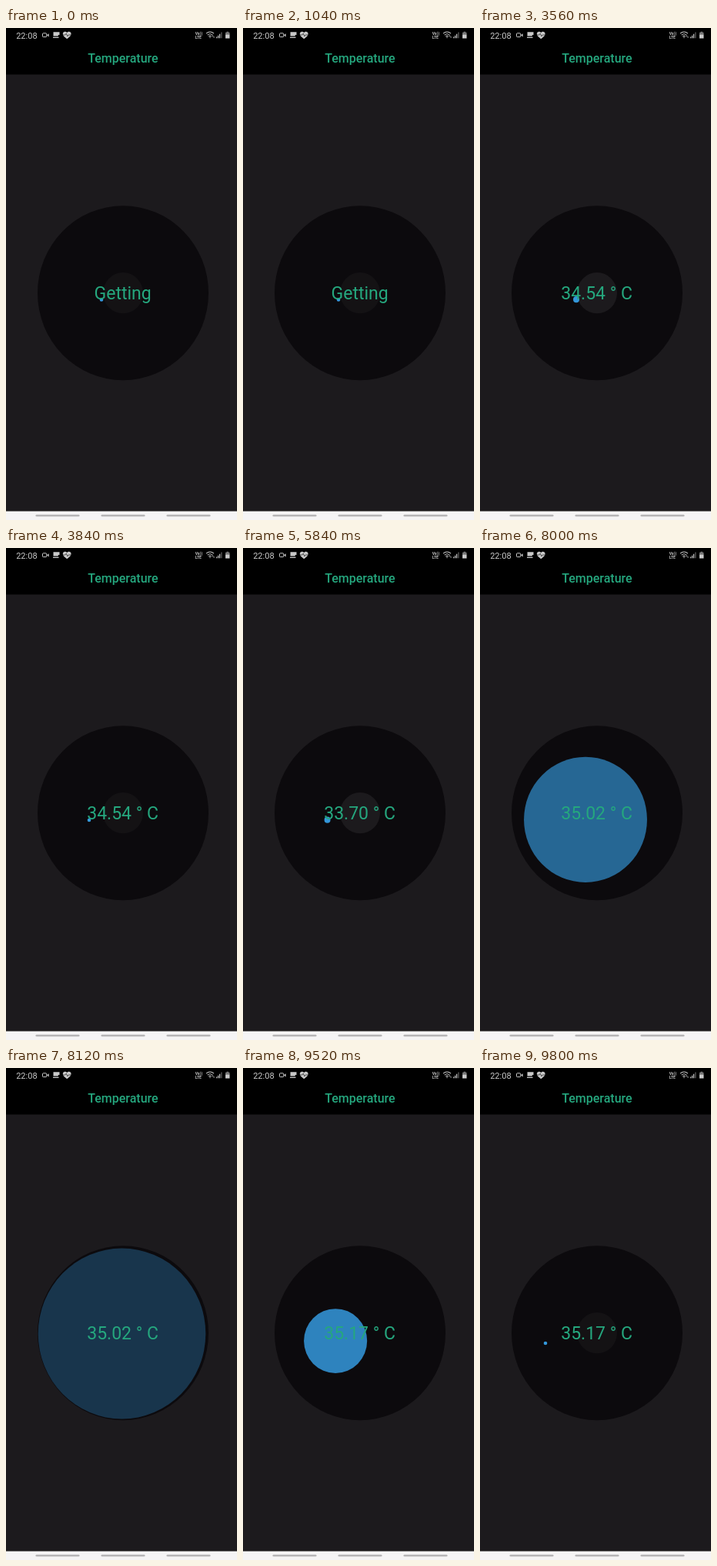
Write an HTML page that moves like this. It is 300 by 640 pixels and loops after 9.96 s.

```html
<!DOCTYPE html>
<html lang="en">
<head>
<meta charset="utf-8">
<title>Temperature</title>
<style>
  html, body { margin: 0; width: 100%; height: 100%; overflow: hidden; background: #1c1a1d; }
  svg { display: block; width: 300px; height: 640px; }
  text { font-family: Roboto, Arial, sans-serif; }
</style>
</head>
<body>
<svg viewBox="0 0 300 640">
  <rect width="300" height="640" fill="#1c1a1d"/>
  <rect width="300" height="60.5" fill="#000"/>

  <!-- status bar -->
  <g fill="#c9c9c9">
    <text x="13.2" y="13.6" font-size="11">22:08</text>
    <rect x="47.5" y="6.8" width="5.2" height="4.8" rx=".8" fill="none" stroke="#c9c9c9"/>
    <path d="M53 9.2l2.6-2v4.2z"/>
    <path d="M61.5 5.3h8v3.6h-1.7v1.6h-6.3z M61 11.7h7.5v1.2h-7.5z"/>
    <path d="M79.2 14.2C75.5 11.5 73.8 9.7 73.8 7.5C73.8 4.4 77.5 3.7 79.2 6C80.9 3.7 84.6 4.4 84.6 7.5C84.6 9.7 82.9 11.5 79.2 14.2z"/>
    <path d="M74 9h3l1.3-2 1.6 4 1.2-2h3" fill="none" stroke="#333" stroke-width=".8"/>
    <g font-size="5" font-weight="700">
      <text x="245.7" y="9">Vo))</text>
      <text x="245.7" y="13.7">LTE</text>
    </g>
    <path d="M260 7.2q5-4.4 10 0M261.7 9.2q3.3-2.8 6.6 0M263.4 11q1.6-1.3 3.2 0" fill="none" stroke="#c9c9c9" stroke-width="1.1"/>
    <path d="M264 12l1 1.3 1-1.3z M267.5 11l1-1.5 1 1.5z M269 11.5h2l-1 1.6z"/>
    <path d="M273 11.5h1.2v1.8h-1.2z M275 9.7h1.2v3.6h-1.2z M277 7.7h1.2v5.6h-1.2z"/>
    <path d="M279.3 5.5h1.2v7.8h-1.2z" fill="#666"/>
    <path d="M286.5 4.7h2.5v1h1.5v3h-5.5v-3h1.5z" fill="#777"/>
    <rect x="285" y="8.5" width="5.5" height="5"/>
  </g>

  <text x="151.9" y="45" font-size="16" font-weight="500" text-anchor="middle" fill="#25a77e">Temperature</text>

  <ellipse cx="152" cy="344.7" rx="111" ry="113.5" fill="#0c0a0d"/>
  <ellipse id="hub" cx="152" cy="344.7" rx="26" ry="26.6" fill="#1c1a1d"/>
  <ellipse id="ripple" fill="#3498db"/>
  <text id="reading" x="151.6" y="353" font-size="23" text-anchor="middle" fill="#25a77e"></text>

  <!-- navigation bar -->
  <rect y="628.6" width="300" height="11.4" fill="#f5f4f5"/>
  <g fill="#b6b5b7">
    <rect x="38.5" y="633" width="57" height="2.6" rx="1.3"/>
    <rect x="123.5" y="633" width="57" height="2.6" rx="1.3"/>
    <rect x="208.5" y="633" width="57" height="2.6" rx="1.3"/>
  </g>
</svg>
<script>
  const LOOP = 9960;
  const FRAME = 40;
  const RIPPLE_MS = 340;
  const CENTER = { x: 152, y: 344.7 };
  const RADIUS = 112;
  const ASPECT = 1.02;
  const FIRST = 0.012;
  const DOT = 2.3;

  // Each tap waits as a dot; when its reading arrives, the ripple runs until the next tap.
  // lead: ripple time already elapsed when the reading appears.
  const taps = [
    { x: 124, y: 353.5, start: 3560, lead: 4, end: 3840, label: "34.54 ° C" },
    { x: 108, y: 354, start: 5840, lead: 4, end: 6120, label: "33.70 ° C" },
    { x: 99.6, y: 374.8, start: 7840, lead: -44, end: 8200, label: "35.02 ° C" },
    { x: 101.7, y: 361, start: 9520, lead: 48, end: 9800, label: "35.17 ° C" },
    { x: 85, y: 358, start: LOOP, end: LOOP }
  ];

  const [hub, reading, ripple] = ["hub", "reading", "ripple"].map(id => document.getElementById(id));
  const lerp = (a, b, k) => a + (b - a) * k;
  const clamp = (v, low, high) => Math.min(high, Math.max(low, v));
  const easeOut = p => 1 - (1 - p) ** 3;

  function set(node, attrs) {
    for (const name in attrs) node.setAttribute(name, attrs[name]);
  }

  function draw(now) {
    const t = Math.floor((now % LOOP) / FRAME) * FRAME;
    const index = taps.findIndex(tap => t < tap.end);
    const tap = taps[index];
    const running = t >= tap.start;
    const label = running ? tap.label : index ? taps[index - 1].label : "Getting";

    const progress = running ? clamp((t - tap.start + tap.lead) / RIPPLE_MS, FIRST, 1) : 0;
    const grown = easeOut(progress);
    const r = running ? RADIUS * grown : DOT;

    set(ripple, {
      cx: lerp(tap.x, CENTER.x, grown),
      cy: lerp(tap.y, CENTER.y, grown),
      rx: r,
      ry: r * ASPECT,
      opacity: 1 - progress
    });
    set(hub, { opacity: running ? clamp(1 - (progress - FIRST) / 0.12, 0, 1) : 0.5 });
    if (reading.textContent !== label) reading.textContent = label;
  }

  const origin = performance.now();
  function tick() {
    draw(performance.now() - origin);
    requestAnimationFrame(tick);
  }
  tick();
</script>
</body>
</html>
```
